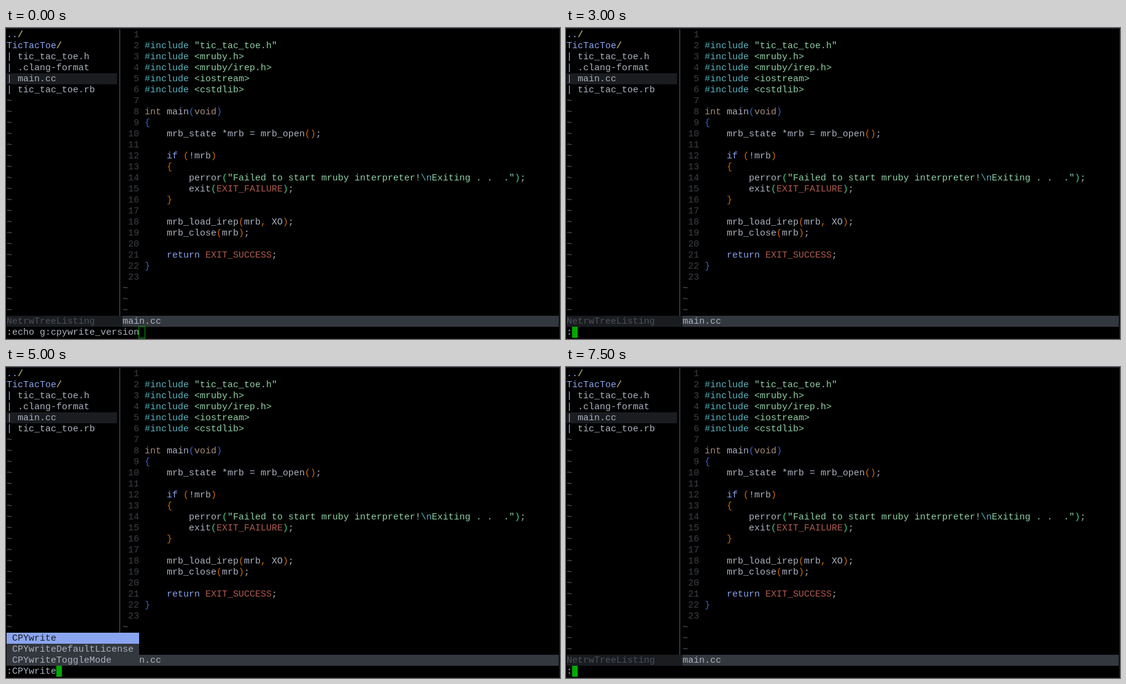
Animation, 903 px wide and 508 px high, one loop 8000 ms. Source, as an HTML page with a canvas:

```html
<!DOCTYPE html>
<html lang="en">
<head>
<meta charset="utf-8">
<title>Editor session</title>
<style>
  html, body { margin: 0; width: 100%; height: 100%; overflow: hidden; background: #000; }
  canvas { display: block; }
</style>
</head>
<body>
<canvas id="stage" width="903" height="508"></canvas>
<script>
const ctx = document.getElementById('stage').getContext('2d');
const LOOP = 8000, CW = 9, CH = 18, X0 = 1, Y0 = 2;
const SPLIT = 21, CODE = 25, STATUS = 26, CMD = 27;

const ink = {
  f: '#abb2bf', c: '#56b6c2', g: '#8fd0a5', t: '#a78d7c', k: '#8aa5f0', r: '#b05a4f',
  y: '#d8cc80', 1: '#3a5fcd', 2: '#cd6600', 3: '#43cd80',
  num: '#3b3f46', tilde: '#5c6370', dim: '#4a4f5a', dark: '#1a1c20',
  bar: '#33373e', line: '#5b5f66', cursor: '#00aa00'
};

// A section sign and a letter switch the ink.
const tree = [
  '§k..§y/', '§kTicTacToe§y/', '§k| §ftic_tac_toe.h', '§k| §f.clang-format',
  '§k| §fmain.cc', '§k| §ftic_tac_toe.rb'
];
const code = [
  '',
  '§c#include §g"tic_tac_toe.h"',
  '§c#include §g<mruby.h>',
  '§c#include §g<mruby/irep.h>',
  '§c#include §g<iostream>',
  '§c#include §g<cstdlib>',
  '',
  '§tint §fmain§1(§tvoid§1)',
  '§1{',
  '§f    mrb_state *mrb = mrb_open§2()§f;',
  '',
  '§k    if §2(§f!mrb§2)',
  '§2    {',
  '§f        perror§3(§g"Failed to start mruby interpreter!§c\\n§gExiting . .  ."§3)§f;',
  '§f        exit§3(§rEXIT_FAILURE§3)§f;',
  '§2    }',
  '',
  '§f    mrb_load_irep§2(§fmrb§2,§f XO§2)§f;',
  '§f    mrb_close§2(§fmrb§2)§f;',
  '',
  '§k    return §rEXIT_SUCCESS§f;',
  '§1}',
  ''
];
const menu = ['CPYwrite', 'CPYwriteDefaultLicense', 'CPYwriteToggleMode'];

const steps = [
  { at: 0, cmd: ':echo g:cpywrite_version', hollow: true },
  { at: 1000, cmd: ':echo g:cpywrite_version' },
  { at: 1500, cmd: '0.1.1', home: true },
  { at: 3000, cmd: ':' },
  { at: 3500, cmd: ':C' },
  { at: 4000, cmd: ':CPY' },
  { at: 5000, cmd: ':CPYwrite', pick: 0 },
  { at: 5500, cmd: ':CPYwriteDefaultLicense', pick: 1 },
  { at: 6000, cmd: 'GPL-3.0-or-later', home: true },
  { at: 7500, cmd: ':' }
];

function fill(col, row, cols, color) {
  ctx.fillStyle = color;
  ctx.fillRect(X0 + col * CW, Y0 + row * CH, cols * CW, CH);
}

function print(text, col, row, color = ink.f) {
  ctx.fillStyle = color;
  for (const ch of text) {
    if (ch !== ' ') ctx.fillText(ch, X0 + col * CW, Y0 + row * CH + 13);
    col++;
  }
}

function printRich(text, col, row) {
  for (const part of text.split('§').slice(1)) {
    print(part.slice(1), col, row, ink[part[0]]);
    col += part.length - 1;
  }
}

function drawFrame() {
  ctx.fillStyle = '#000';
  ctx.fillRect(0, 0, 903, 508);
  ctx.fillStyle = '#262a36';
  ctx.fillRect(0, 0, 903, 1);
  ctx.fillStyle = '#20222c';
  ctx.fillRect(902, 0, 1, 508);
  ctx.fillStyle = '#1c0f1c';
  ctx.fillRect(0, 507, 903, 1);
}

function drawPanes() {
  fill(0, 4, 20, ink.dark);
  tree.forEach((text, row) => printRich(text, 0, row));
  for (let row = tree.length; row < STATUS; row++) print('~', 0, row, ink.tilde);

  ctx.fillStyle = ink.line;
  ctx.fillRect(185, Y0, 1, STATUS * CH);

  code.forEach((text, row) => {
    print(String(row + 1).padStart(3), SPLIT, row, ink.num);
    printRich(text, CODE, row);
  });
  for (let row = code.length; row < STATUS; row++) print('~', SPLIT, row, ink.tilde);

  fill(0, STATUS, SPLIT, ink.dark);
  print('NetrwTreeListing', 0, STATUS, ink.dim);
  fill(SPLIT, STATUS, 79, ink.bar);
  print('main.cc', SPLIT, STATUS);
}

function drawMenu(pick) {
  menu.forEach((item, i) => {
    const row = 24 + i, on = i === pick;
    fill(0, row, 24, on ? ink.k : ink.bar);
    print(item, 1, row, on ? ink.dark : ink.f);
  });
}

function drawCursor(col, row, hollow) {
  if (!hollow) return fill(col, row, 1, ink.cursor);
  ctx.strokeStyle = ink.cursor;
  ctx.lineWidth = 1;
  ctx.strokeRect(X0 + col * CW - 0.5, Y0 + row * CH - 0.5, CW + 1, CH + 1);
}

function draw(t) {
  const step = steps.findLast(s => s.at <= t);
  ctx.font = '15px "Liberation Mono", monospace';
  drawFrame();
  drawPanes();
  if (step.pick !== undefined) drawMenu(step.pick);
  print(step.cmd, 0, CMD);
  if (step.home) drawCursor(CODE, 0);
  else drawCursor(step.cmd.length, CMD, step.hollow);
}

const start = performance.now();
function tick() {
  draw((performance.now() - start) % LOOP);
  requestAnimationFrame(tick);
}
tick();
</script>
</body>
</html>
```
